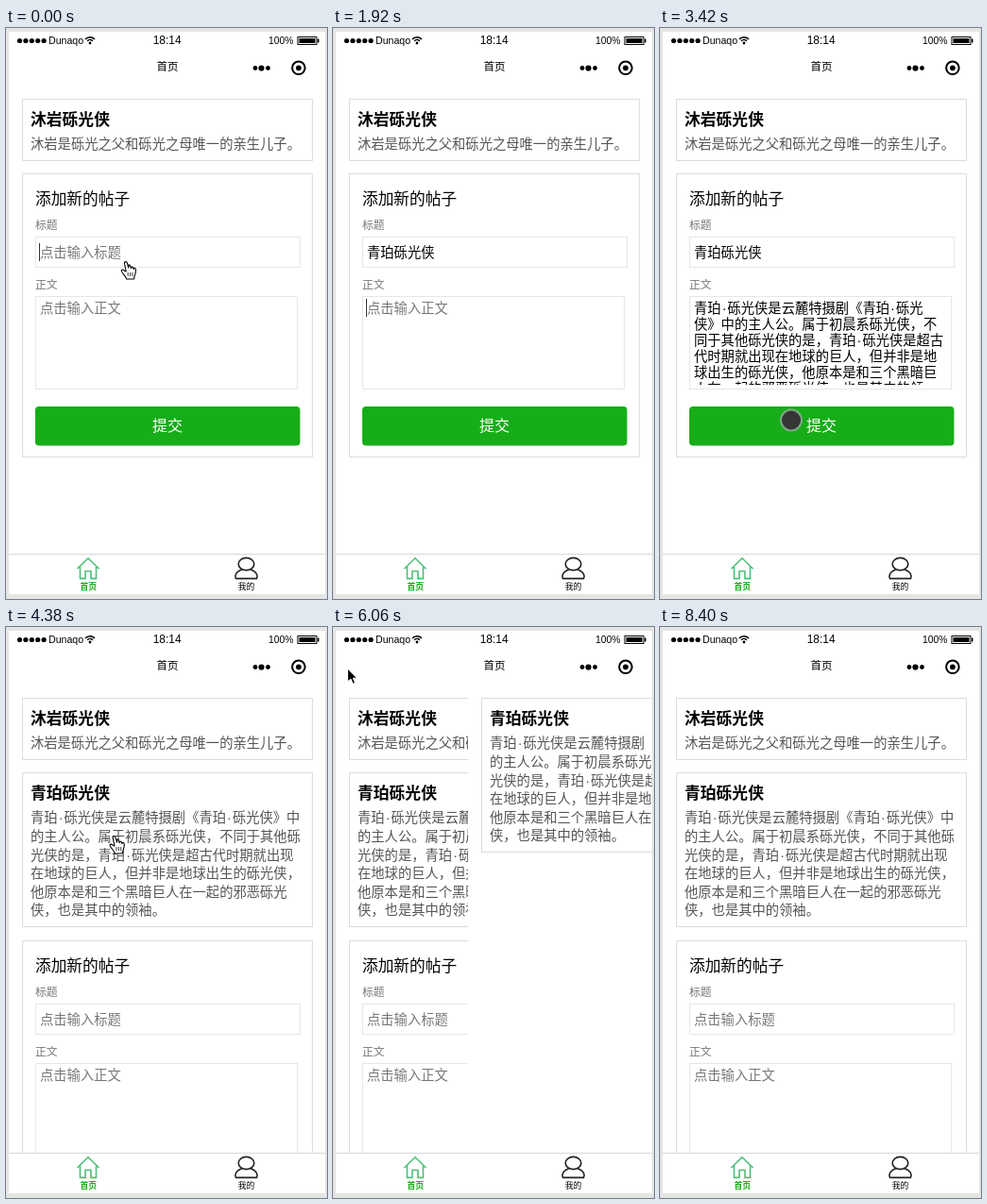
Animation of 340 by 605 pixels, one loop 8460 ms. Source, as an HTML page with a canvas:

```html
<!DOCTYPE html>
<html lang="zh-CN">
<head>
<meta charset="utf-8">
<style>
html, body { margin: 0; width: 340px; height: 605px; overflow: hidden; background: #e5e5e3; }
canvas { display: block; }
</style>
</head>
<body>
<canvas id="stage" width="340" height="605"></canvas>
<script>
const c = document.getElementById('stage').getContext('2d', { alpha: false });
const LOOP = 8460, GREEN = '#16ad18', MINT = '#4abf78';
const CJK = '"Noto Sans CJK SC", "Noto Sans CJK", sans-serif';
const LATIN = '"Liberation Sans", Arial, sans-serif';

const FIRST = '沐岩砾光侠', SECOND = '青珀砾光侠';
const INTRO = ['沐岩是砾光之父和砾光之母唯一的亲生儿子。'];
const BODY = '青珀·砾光侠是云麓特摄剧《青珀·砾光侠》中的主人公。属于初晨系砾光侠，' +
  '不同于其他砾光侠的是，青珀·砾光侠是超古代时期就出现在地球的巨人，但并非是地球出生的砾光侠，' +
  '他原本是和三个黑暗巨人在一起的邪恶砾光侠，也是其中的领袖。';
const cut = stops => stops.slice(1).map((end, i) => BODY.slice(stops[i], end));
const POST = cut([0, 21, 41, 61, 81, 100, BODY.length]);
const DRAFT = cut([0, 18, 36, 55, 73, 91, 108]);

// Event times in ms
const TYPE = 900, FOCUS_BODY = 1740, PASTE = 2400, SUBMIT = 3720;
const OPEN = 5100, BACK = 5976, SLIDE = 360;
const MINE = 6900, MINE_PAGE = 7020, HOME = 7680, HOME_PAGE = 7740;

// Pointer keys: time, x, y, shape used until the next key
const POINTER = [
  [0, 127, 248, 'hand'], [600, 127, 248, ''],
  [3000, 190, 340, 'disc'], [3300, 139, 415.5, 'disc'], [3720, 139, 415.5, 'hand'],
  [3900, 139, 415.5, 'hand'], [4500, 112, 200, 'hand'], [5000, 112, 200, 'arrow'],
  [5280, 67.5, 56, 'arrow'], [5520, 15.5, 44, 'arrow'], [6120, 15.5, 44, 'arrow'],
  [6760, 249, 579, 'hand'], [7260, 249, 579, 'hand'], [7560, 86, 570, 'hand'],
  [8100, 86, 570, 'arrow'], [8360, 130, 606, ''], [LOOP, 130, 606, '']
];

function text(str, x, y, size, color, { bold, align = 'left', font = CJK } = {}) {
  c.font = `${bold ? 700 : 400} ${size}px ${font}`;
  c.fillStyle = color;
  c.textAlign = align;
  c.fillText(str, x, y + size * 0.38);
}

// Running text with a narrow middle dot
function prose(str, x, y, size, color) {
  str.split('·').forEach((part, i) => {
    if (i) {
      text('·', x + size * 0.24, y, size, color, { align: 'center', font: LATIN });
      x += size * 0.48;
    }
    text(part, x, y, size, color);
    x += c.measureText(part).width;
  });
}

function frame(x, y, w, h, color) {
  c.strokeStyle = color;
  c.lineWidth = 1;
  c.strokeRect(x + 0.5, y + 0.5, w, h);
}

function dot(x, y, r, color) {
  c.fillStyle = color;
  c.beginPath();
  c.arc(x, y, r, 0, 7);
  c.fill();
}

function line(path, color, width, fill) {
  const p = new Path2D(path);
  if (fill) {
    c.fillStyle = fill;
    c.fill(p);
  }
  c.strokeStyle = color;
  c.lineWidth = width;
  c.stroke(p);
}

function clipped(x, y, w, h, draw) {
  c.save();
  c.beginPath();
  c.rect(x, y, w, h);
  c.clip();
  draw();
  c.restore();
}

function card(y, title, lines) {
  frame(17, y, 307, 46 + 19.6 * lines.length | 0, '#dcdcdc');
  text(title, 26, y + 22, 16.8, '#000', { bold: true });
  lines.forEach((s, i) => prose(s, 26, y + 48 + i * 19.6, 14.3, '#555'));
}

function caret(t, x, y) {
  if (t % 1000 < 500 || t > FOCUS_BODY && t < FOCUS_BODY + 500) {
    c.fillStyle = '#333';
    c.fillRect(x, y, 1, 19);
  }
}

function form(y, t) {
  c.save();
  c.translate(0, y);
  frame(17, 0, 307, 300, '#dcdcdc');
  text('添加新的帖子', 31, 27, 16.7, '#000');
  text('标题', 31, 55, 11.8, '#777');
  frame(31, 67, 280, 32, '#e6e6e6');
  const editing = t < SUBMIT;
  const typed = editing && t >= TYPE ? SECOND.slice(0, 1 + (t - TYPE) / 140) : '';
  text(typed || '点击输入标题', 36, 84, 14.3, typed ? '#000' : '#777');
  if (t < FOCUS_BODY) caret(t, 35 + typed.length * 14.3, 74);

  text('正文', 31, 117.5, 11.8, '#777');
  frame(31, 130, 277, 98, '#e6e6e6');
  if (editing && t >= PASTE) {
    clipped(32, 131, 276, 93, () =>
      DRAFT.forEach((s, i) => prose(s, 36, 143 + i * 16.9, 14.3, '#000')));
  } else {
    text('点击输入正文', 36, 143, 14.3, '#777');
    if (t >= FOCUS_BODY && editing) caret(t, 35, 133);
  }

  c.fillStyle = t > 3600 && t < SUBMIT ? '#149b15' : GREEN;
  c.beginPath();
  c.roundRect(31, 247, 280.5, 41.5, 4);
  c.fill();
  text('提交', 171, 267, 16, '#fff', { align: 'center' });
  c.restore();
}

function statusBar() {
  for (let i = 0; i < 5; i++) dot(14.5 + i * 6.4, 13.5, 2.6, '#000');
  text('Dunaqo', 45, 13.3, 10.6, '#000', { font: LATIN });
  c.strokeStyle = '#000';
  c.lineWidth = 1.6;
  for (const r of [6.8, 4]) {
    c.beginPath();
    c.arc(89, 16.5, r, -Math.PI * 0.76, -Math.PI * 0.24);
    c.stroke();
  }
  dot(89, 16, 1.4, '#000');
  text('18:14', 170.7, 12.4, 12, '#000', { font: LATIN, align: 'center' });
  text('100%', 278, 13.5, 10.4, '#000', { font: LATIN });
  frame(308.5, 9, 20, 8, '#000');
  c.fillStyle = '#000';
  c.fillRect(310.5, 11, 17, 5);
  c.fillRect(330, 11.5, 1.5, 4);
}

function navBar(title, back) {
  text(title, 171, 41, 11.5, '#000', { align: 'center' });
  if (back) line('M20 36L13.5 42.5L20 49', '#000', 2.2);
  dot(264, 42.5, 2.4, '#000');
  dot(270.5, 42.5, 3.1, '#000');
  dot(277.5, 42.5, 2.4, '#000');
  line('M316.7 42.3a6.8 6.8 0 1 1-13.6 0a6.8 6.8 0 1 1 13.6 0', '#000', 2);
  dot(309.9, 42.3, 2.9, '#000');
}

function tabBar(mine) {
  c.fillStyle = '#fff';
  c.fillRect(3, 557, 335, 43);
  c.fillStyle = '#d8d8d8';
  c.fillRect(3, 557, 335, 1);
  const home = mine ? '#222' : MINT, me = mine ? MINT : '#222';
  line('M75.5 573L87 561.8L98.5 573M78.5 571V583.4H84V575.5H90V583.4H95.5V571', home, 1.6);
  line('M250.5 573.5C243 576 242 581 243.5 583.4H265.5C267 581 266 576 258.5 573.5', me, 1.6);
  line('M262.8 568a8.3 6.6 0 1 1-16.6 0a8.3 6.6 0 1 1 16.6 0', me, 1.6, '#fff');
  text('首页', 87.3, 592, 8.8, mine ? '#000' : GREEN, { bold: !mine, align: 'center' });
  text('我的', 254.5, 592, 8.8, mine ? GREEN : '#000', { bold: mine, align: 'center' });
}

function pointer(t) {
  const i = POINTER.findIndex((k, n) => t >= k[0] && t < POINTER[n + 1][0]);
  const [t0, x0, y0, shape] = POINTER[i], [t1, x1, y1] = POINTER[i + 1];
  if (!shape) return;
  const p = (t - t0) / (t1 - t0), e = p * p * (3 - 2 * p);
  c.save();
  c.translate(x0 + (x1 - x0) * e, y0 + (y1 - y0) * e);
  c.lineJoin = 'round';
  if (shape === 'disc') {
    dot(0, 0, 12, '#7fa886');
    dot(0, 0, 10, '#353535');
  } else if (shape === 'arrow') {
    line('M0 0V14L3.3 11L5.7 16.2L8 15.2L5.7 10.2H10Z', '#fff', 1, '#000');
  } else {
    line('M-1.6 1C-1.6-.8 1-.8 1.4 1L2.8 6C3-.2 5 4.2 5.4 6.6C6 4 8 5 8 7.4C9 5.6 10.6 6.5 10.5 8.5' +
      'C10.6 12 9 14 8.5 18H.6C0 15-3 13.4-4.6 9.6C-5 7.8-3 7.4-1.6 9.2L.2 10Z', '#000', 1.1, '#fff');
    line('M2.2 11V15M4.6 11V15M7 11V15', '#000', 0.8);
  }
  c.restore();
}

// Distance of the detail page from its resting place
function slideOffset(t) {
  const out = t >= BACK, p = Math.min(1, (t - (out ? BACK : OPEN)) / SLIDE);
  const rest = (1 - p) ** 2;
  return 336 * (out ? 1 - rest : rest);
}

function draw(t) {
  c.fillStyle = '#e5e5e3';
  c.fillRect(0, 0, 340, 605);
  c.fillStyle = '#fff';
  c.fillRect(3, 4, 335, 596);
  const detail = t >= OPEN && t < BACK, mine = t >= MINE && t < HOME;
  clipped(3, 55, 335, 502, () => {
    if (t >= MINE_PAGE && t < HOME_PAGE) return;
    card(75, FIRST, INTRO);
    if (t >= SUBMIT) card(154, SECOND, POST);
    form(t >= SUBMIT ? 332 : 154, t);
  });
  if (t >= OPEN && t < BACK + SLIDE) {
    clipped(3, 55, 335, 545, () => {
      c.translate(Math.round(slideOffset(t)), 0);
      c.fillStyle = '#fff';
      c.fillRect(3, 55, 335, 545);
      card(75, SECOND, POST);
    });
  }
  statusBar();
  navBar(detail ? '帖子详情' : mine ? '我的' : '首页', detail);
  if (!detail) tabBar(mine);
  pointer(t);
}

function tick() {
  draw(performance.now() % LOOP);
  requestAnimationFrame(tick);
}
tick();
</script>
</body>
</html>
```
